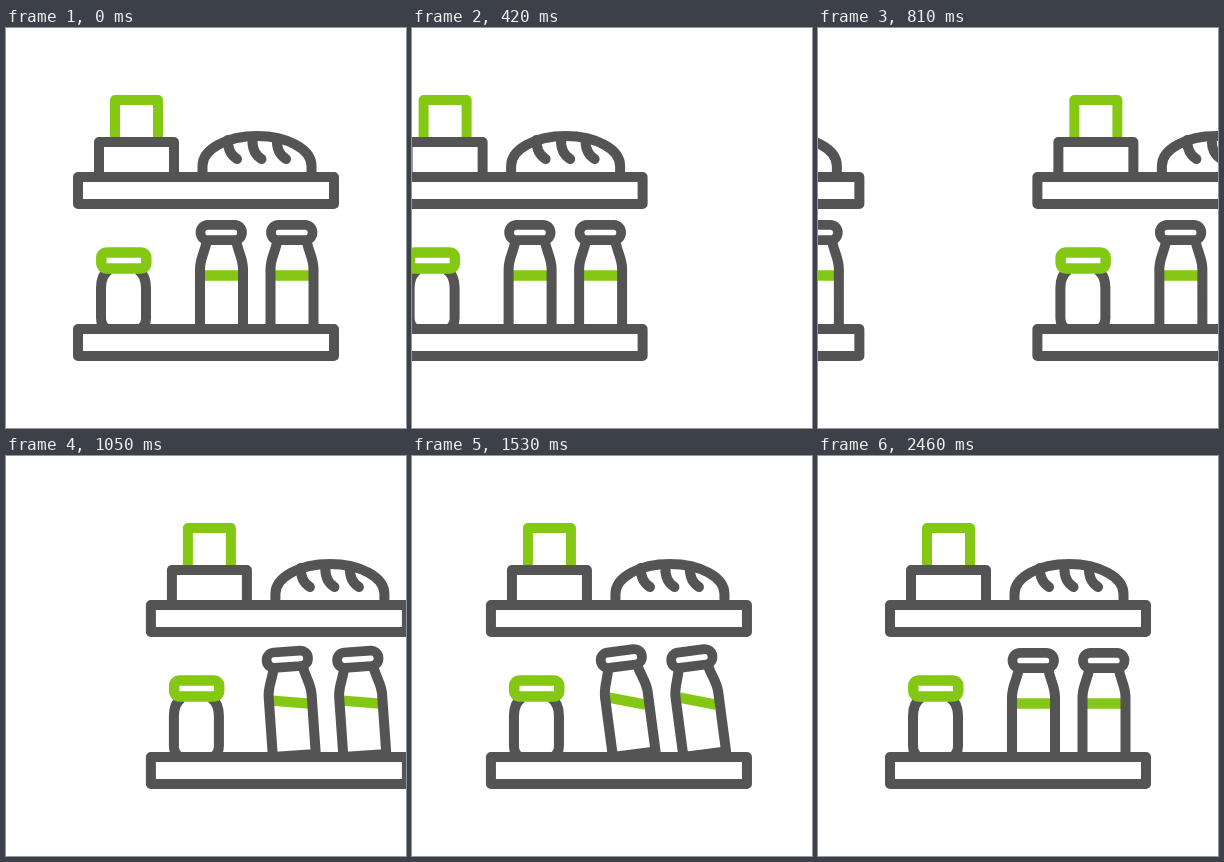
Write an HTML page with a canvas that moves like this. It is 400 px wide and 400 px high and loops after 2490 ms.

```html
<!DOCTYPE html>
<html lang="en">
<head>
<meta charset="utf-8">
<title>Grocery shelves</title>
<style>
  html, body { margin: 0; width: 100%; height: 100%; overflow: hidden; background: #fff; }
  canvas { display: block; width: 400px; height: 400px; }
</style>
</head>
<body>
<canvas id="stage" width="400" height="400"></canvas>
<script>
const ctx = document.getElementById('stage').getContext('2d');
const GRAY = '#545454', GREEN = '#84c814';
const LOOP = 2490, STEP = 30;
const SPACING = 434, SLIDE_TIME = 1785;

// Keyframes as [ms, degrees], eased in and out between neighbours.
const LEAN = [[790, 0], [1340, -8.8], [2140, 0]];
const LIQUID = [[790, 0], [1400, 12], [2160, -4.5], [2460, 0]];

const smooth = s => s * s * (3 - 2 * s);

function keyed(keys, t) {
  if (t <= keys[0][0]) return keys[0][1];
  for (let i = 1; i < keys.length; i++) {
    const [t0, v0] = keys[i - 1], [t1, v1] = keys[i];
    if (t < t1) return v0 + (v1 - v0) * smooth((t - t0) / (t1 - t0));
  }
  return keys[keys.length - 1][1];
}

// Cubic Bezier easing with horizontal handles, solved by bisection.
function slideEase(x) {
  if (x >= 1) return 1;
  let lo = 0, hi = 1;
  for (let i = 0; i < 30; i++) {
    const s = (lo + hi) / 2, r = 1 - s;
    const bx = 3 * r * r * s * 0.328 + 3 * r * s * s * 0.314 + s * s * s;
    if (bx < x) lo = s; else hi = s;
  }
  return smooth(lo);
}

function stroke(path, color = GRAY, width = 10, cap = 'butt') {
  ctx.strokeStyle = color;
  ctx.lineWidth = width;
  ctx.lineCap = cap;
  ctx.lineJoin = 'round';
  ctx.stroke(typeof path === 'string' ? new Path2D(path) : path);
}

function roundBox(x, y, w, h, r, color, width) {
  const path = new Path2D();
  path.roundRect(x, y, w, h, r);
  stroke(path, color, width);
}

function shelf(y) {
  stroke(`M72 ${y}H328V${y + 27}H72Z`);
}

function boxes() {
  stroke('M109 110V72H152V110', GREEN);
  stroke('M93 149V114H168V149');
}

function bread() {
  stroke('M196.5 148V138C196.5 121 221 108 251 108S305.5 121 305.5 138V148');
  for (const x of [222, 246.5, 271]) {
    stroke(`M${x} 112Q${x - 0.5} 125 ${x + 9} 131`, GRAY, 10, 'round');
  }
}

function jar() {
  stroke('M103 242Q95 247 95 260V290Q95 298 101 301H134Q140 298 140 290V260Q140 247 132 242');
  roundBox(95.3, 224.4, 45, 16.2, 5, GREEN, 10.5);
}

function bottle(dx, lean, liquid) {
  const rad = Math.PI / 180;
  ctx.save();
  ctx.translate(194 + dx, 301);
  ctx.rotate(lean * rad);
  ctx.translate(-194, -301);

  ctx.save();
  ctx.translate(215.5, 247.5);
  ctx.rotate((liquid - lean) * rad);
  stroke('M-18.5 0H18.5', GREEN, 10.5);
  ctx.restore();

  stroke('M201 212C199 224 194 230 194 241V301H237V241C237 230 232 224 230 212');
  roundBox(194.5, 196.8, 41.5, 15.4, 7.5, GRAY, 9.7);
  ctx.restore();
}

function scene(x, lean, liquid) {
  ctx.save();
  ctx.translate(x, 0);
  boxes();
  bread();
  shelf(149);
  jar();
  bottle(0, lean, liquid);
  bottle(70.5, lean, liquid);
  shelf(301);
  ctx.restore();
}

function draw(now) {
  const t = Math.floor((now % LOOP) / STEP) * STEP;
  const x = -SPACING * slideEase(t / SLIDE_TIME);
  const lean = keyed(LEAN, t), liquid = keyed(LIQUID, t);
  ctx.fillStyle = '#fff';
  ctx.fillRect(0, 0, 400, 400);
  scene(x, lean, liquid);
  scene(x + SPACING, lean, liquid);
}

let start;
function tick(now) {
  start ??= now;
  draw(Math.max(0, now - start));
  requestAnimationFrame(tick);
}
draw(0);
requestAnimationFrame(tick);
</script>
</body>
</html>
```
